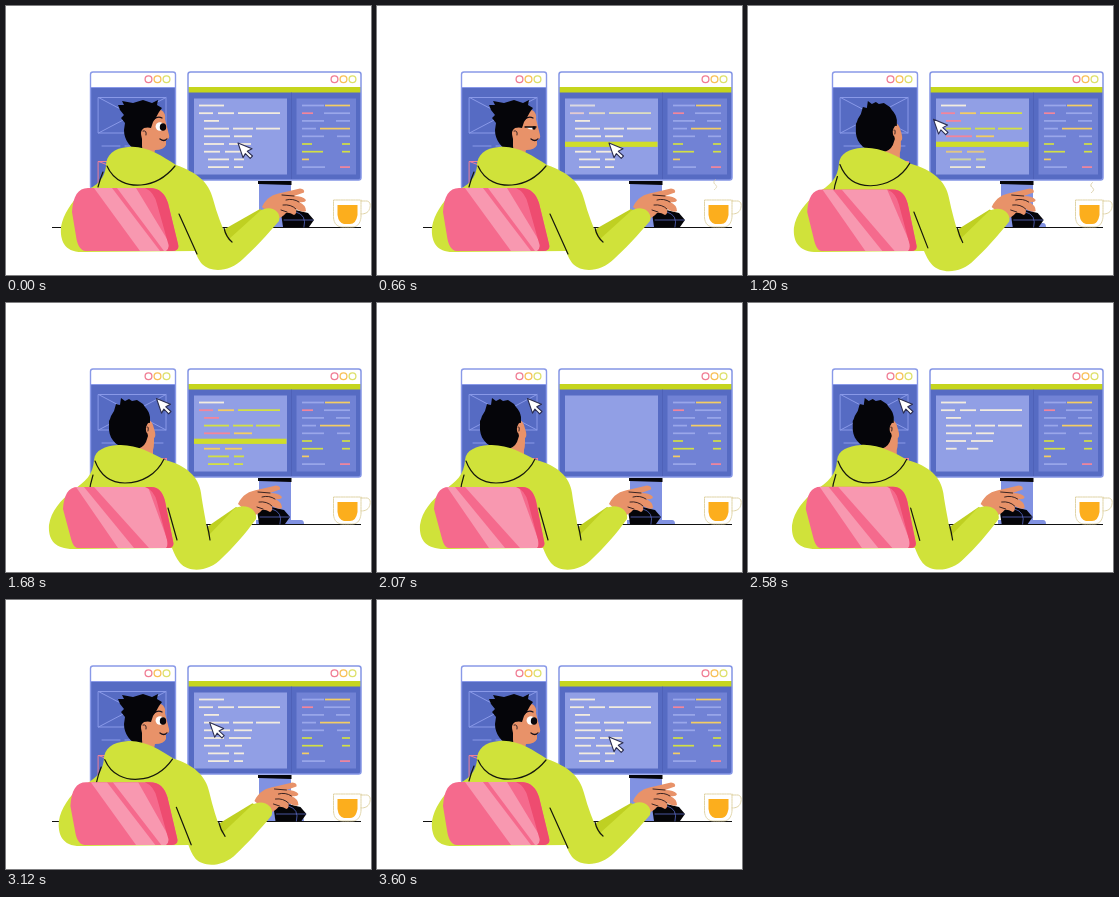
These frames come from a looping animation (365x269 px, 3630 ms). An HTML page:

```html
<!DOCTYPE html>
<html lang="en">
<head>
<meta charset="utf-8">
<title>Developer at a desk</title>
<style>
html, body { margin: 0; width: 100%; height: 100%; overflow: hidden; background: #fff; }
svg { display: block; width: 365px; height: 269px; }
</style>
</head>
<body>
<svg viewBox="0 0 365 269" fill="none" stroke-linecap="round" stroke-linejoin="round">
  <defs>
    <clipPath id="chairClip"><path id="chairEdge"/></clipPath>
    <clipPath id="faceClip"><path id="faceEdge"/></clipPath>
  </defs>

  <g id="leftWindow">
    <rect x="84.5" y="66" width="85" height="117" rx="2.5" fill="#566bc3"/>
    <path d="M84.5 82V68.5Q84.5 66 87 66H167Q169.5 66 169.5 68.5V82Z" fill="#fff"/>
    <rect x="84.5" y="66" width="85" height="117" rx="2.5" stroke="#8999e8" stroke-width="1.4"/>
    <path d="M85 81.5H169M92.5 91.5H160V127H92.5ZL160 127M160 91.5L92.5 127M96 140H114M119 140H157" stroke="#8999e8"/>
    <path d="M92.5 155.5H160.5V181H92.5ZL160.5 181M160.5 155.5L92.5 181" stroke="#ef8097"/>
  </g>

  <g id="rightWindow">
    <rect x="182" y="66" width="173" height="108" rx="2.5" fill="#566bc3"/>
    <path d="M182 82V68.5Q182 66 184.5 66H352.5Q355 66 355 68.5V82Z" fill="#fff"/>
    <path d="M182 81H355V86.5H182Z" fill="#c5d51d"/>
    <path d="M188 92.5H281V168.5H188Z" fill="#919fe5"/>
    <path d="M290.5 92.5H350V168.5H290.5Z" fill="#7182d5"/>
    <path d="M285.5 87V173" stroke="#4e61b8"/>
    <rect x="182" y="66" width="173" height="108" rx="2.5" stroke="#8495e5" stroke-width="1.5"/>
  </g>
  <g id="dots" stroke-width="1.3"></g>
  <g id="notes" stroke-width="1.7" stroke-linecap="butt"></g>
  <g id="code" stroke-width="1.8" stroke-linecap="butt"></g>
  <rect id="bar" x="188" y="135.7" height="5.2" fill="#d0dd2a"/>

  <path d="M253 175H285V217H295Q298 217 298 221H250V217H253Z" fill="#8192e2"/>
  <path d="M252 175H285.5V179L252 178Z" fill="#050509"/>
  <path d="M46 221.5H355" stroke="#111" stroke-linecap="butt"/>

  <g id="cup">
    <path d="M327.5 194H355V211Q354 221 346 221H337Q328 221 327.5 211Z" fill="#fff"/>
    <path d="M327.5 194H355V211Q354 221 346 221H337Q328 221 327.5 211ZM355 195H361Q365 196 364 201Q363 208 355 208" stroke="#dccf9b" stroke-width=".9" stroke-dasharray="1.6 .9"/>
    <path d="M331.5 199H351.5V209Q350 218 344 218H338Q332.5 217 331.5 209Z" fill="#fcae1d"/>
  </g>
  <path id="steam" stroke="#d5c89b" stroke-width=".9" stroke-dasharray="1.8 1"/>

  <g id="hand">
    <path d="M277 221L275 207L285 203L302 207L308 214L303 221Z" fill="#050509"/>
    <path d="M290 206Q301 209 298 221M278 214H307" stroke="#5969c3" stroke-width=".8"/>
    <path d="M256 201C260 192 267 188 277 186.5L294 182.5Q299 183 298 186.5L288 190Q297 190 300 194Q299 197 293 196Q300 199 300 205Q297 207 290 203Q291 208 288 209Q283 206 280 207Q276 212 270 213Z" fill="#e89269"/>
    <path d="M276 189L288 190M280 194Q287 192 293 196M277 199Q285 198 290 203M275 204L281 206" stroke="#25171a" stroke-width=".9"/>
  </g>

  <g id="head">
    <path id="face" fill="#e89269"/>
    <g clip-path="url(#faceClip)">
      <g id="features">
        <path d="M148 113Q152 110 156 112M154 133Q158 136 161 133" stroke="#17101a" stroke-width="1.3"/>
        <g id="openEye">
          <ellipse cx="153.8" cy="120.5" rx="4.2" ry="4.2" fill="#fff"/>
          <ellipse cx="157" cy="121" rx="3.2" ry="3.8" fill="#08070b"/>
        </g>
        <g id="calmEye">
          <path d="M149 121H159Q155 126 149 121Z" fill="#fff"/>
          <circle cx="157" cy="122" r="1.7" fill="#08070b"/>
          <path d="M148 121H159" stroke="#08070b" stroke-width="1.3"/>
        </g>
      </g>
    </g>
    <path id="hair" fill="#050509"/>
    <ellipse id="ear" fill="#e89269"/>
    <path id="earLine" stroke="#25171a" stroke-width=".9"/>
  </g>

  <path id="fold" fill="#bfd022"/>
  <path id="body" fill="#d0e23a"/>
  <path id="seams" stroke="#15170c" stroke-width="1.2"/>
  <path id="chair" fill="#f56a8d"/>
  <g clip-path="url(#chairClip)">
    <path id="shine" fill="#f898b0"/>
    <path id="side" fill="#ee4c70"/>
  </g>
  <path id="cursor" d="M0 0L14 5.8L9.3 8.3L14.5 13L12.2 15.3L7.4 10.6L5 14.6Z" fill="#fff" stroke="#2b2d4f" stroke-width="1.1"/>
</svg>

<script>
const LOOP = 3630;
const $ = id => document.getElementById(id);
const set = (id, attrs) => {
  for (const k in attrs) $(id).setAttribute(k, attrs[k]);
};
const clamp = x => Math.max(0, Math.min(1, x));
const lerp = (a, b, p) => a + (b - a) * p;
const span = (t, from, to) => clamp((t - from) / (to - from));
const ease = u => u < .5 ? 2 * u * u : 1 - 2 * (1 - u) * (1 - u);
// 0 to 1 and back again within the loop
const trip = (t, a, b, c, d) => ease(span(t, a, b)) - ease(span(t, c, d));

function add(parent, tag, attrs) {
  const el = document.createElementNS('http://www.w3.org/2000/svg', tag);
  for (const k in attrs) el.setAttribute(k, attrs[k]);
  $(parent).append(el);
  return el;
}

// Points to the right, on the arm, follow the arm's own progress.
function blend([a, b], p, arm = p) {
  const ends = b.match(/[\d.]+/g);
  let i = 0;
  return a.replace(/([\d.]+) ([\d.]+)/g, (_, x, y) => {
    const q = lerp(p, arm, span(+x, 150, 200));
    return lerp(+x, +ends[i++], q).toFixed(2) + ' ' + lerp(+y, +ends[i++], q).toFixed(2);
  });
}

// Each shape has a right-leaning and a left-leaning pose.
const bodyShapes = {
  body: [
    'M100 160C100 149 108 142 122 141C140 139 156 150 170 159C190 166 203 176 207 193C211 208 216 221 222 234L254 205C264 198 276 205 273 215C262 228 246 245 237 253C224 266 205 267 196 258C192 253 191 250 189 245L78 246C58 247 54 234 55 221C57 208 66 196 74 188C90 180 98 175 100 160Z',
    'M88 157C89 147 99 143 112 142C130 141 146 150 159 157C180 162 193 174 195 190C197 205 200 217 202 233L228 206C238 199 252 206 250 216C240 230 225 247 216 255C203 269 183 270 174 260C170 255 168 250 166 245L70 246C48 247 42 236 43 222C45 208 55 197 66 188C80 178 87 172 88 157Z'
  ],
  fold: ['M217 224L254 203L262 208L222 238Z', 'M198 226L230 204L238 208L202 238Z'],
  seams: [
    'M101 160C108 176 123 180 135 179C149 178 160 171 169 160M92 181Q94 173 97 166M173 208L191 248M218 222Q220 231 226 236',
    'M89 158C95 174 106 180 119 180C136 180 151 171 158 156M83 192Q84 181 87 172M162 205L171 237M201 222Q203 229 204 237'
  ]
};
const chairShapes = {
  chair: [
    'M66 206C67 190 72 182 82 182L143 182C154 182 159 188 162 197L172 238Q174 245 166 245L80 245C74 245 71 238 70 230Z',
    'M57 206C58 192 62 184 72 184L145 184C153 184 157 190 159 198L167 238Q169 245 162 245L72 245C68 245 66 240 64 232Z'
  ],
  shine: [
    'M88 182L106 182L154 245L134 245ZM111 182L130 182L164 238L162 245L158 245Z',
    'M70 184L78 184L128 245L112 245ZM88 184L142 184L161 236L161 245L143 245Z'
  ],
  side: [
    'M139 181L162 181L178 245L160 245Q164 242 162 237L151 198Q148 186 139 182Z',
    'M139 183L162 183L172 245L160 245Q163 242 161 237L151 199Q148 187 139 184Z'
  ]
};
const headShapes = {
  face: [
    'M135 105L152 103C158 104 160 109 159 113L163 129Q164 133 160 134L160 139Q158 144 149 144L146 158L128 158L126 130Z',
    'M125 118L140 115C144 117 146 119 147 122L149 129Q150 134 148 135L148 140Q148 144 147 147L147 156L122 156L120 130Z'
  ],
  hair: [
    'M114 104L112 99L118 99L116 95L127 97L137 94L146 97L152 94L151 99L156 102L153 106Q150 112 147 116L145 122Q142 121 138 122Q134 126 136 133L136 140Q137 145 134 146C124 142 118 134 118 124L119 117L115 112L118 109Z',
    'M105 113L108 108L110 101L114 102L115 95L119 98L123 96L126 98L131 97L137 101L139 104Q143 108 144 114L144 120Q142 119 141 122Q140 127 142 133L140 139Q137 145 130 146C113 147 104 138 103 127L103 122L103 118L104 116Z'
  ],
  earLine: ['M137 125Q141 124 140 129', 'M141 124Q143 123 142 128']
};

const colors = { w: '#f3ecdf', p: '#f3859b', y: '#f4cd63', g: '#d3e044', l: '#9aa7ea' };
const rowY = i => 99.5 + i * 7.7;

// "start-end colour" for every dash of a row
const parse = row => row.split(' ').map(s => {
  const [, a, b, c] = s.match(/(\d+)-(\d+)(\w)/);
  return { a: +a, b: +b, c };
});
const codeRows = [
  '193-218w', '193-207p 212-228y 232-274g', '198-213p', '198-223g 227-247g 250-274g',
  '198-224p 228-246y', '198-218g 223-245g', '198-214y 219-236y', '202-223g 228-238g', '202-223g 228-237g'
].map(parse);
const noteRows = [
  '296-318l 319-344y', '296-307p 318-344l', '296-318l 330-344l', '296-310l 314-344y',
  '296-318l 331-344l', '296-306g 336-344g', '296-317g 336-344g', '296-303y', '296-319l 334-344p'
].map(parse);

const dashes = [];
codeRows.forEach((row, i) => row.forEach(d => {
  dashes.push({
    ...d, row: i,
    plain: add('code', 'path', { stroke: colors.w }),
    tint: add('code', 'path', { stroke: colors[d.c] })
  });
}));
noteRows.forEach((row, i) => row.forEach(d =>
  add('notes', 'path', { d: `M${d.a} ${rowY(i)}H${d.b}`, stroke: colors[d.c] })));
for (const x of [142.5, 328.5])
  ['#f07c93', '#f8c055', '#dde069'].forEach((stroke, i) =>
    add('dots', 'circle', { cx: x + i * 9, cy: 73.2, r: 3.4, stroke }));

function drawCode(t) {
  const retyping = t >= 2060;
  const gone = retyping ? 0 : span(t, 1800, 2060);
  for (const { a, b, row, plain, tint } of dashes) {
    const shown = retyping ? clamp((t - 2100) / 72 - row) : 1;
    const d = `M${a} ${rowY(row)}H${lerp(a, b, shown)}`;
    const mix = retyping ? 0 : span(t, 530 + row * 82, 760 + row * 82);
    plain.setAttribute('d', d);
    plain.setAttribute('opacity', shown ? (1 - mix) * (1 - gone) : 0);
    tint.setAttribute('d', d);
    tint.setAttribute('opacity', mix * (1 - gone));
  }
  set('bar', { width: 92.5 * ease(span(t, 300, 600)), opacity: retyping ? 0 : 1 - gone });
}

function drawSteam(t) {
  const u = span(t, 540, 1440);
  const x = lerp(337, 347, u);
  const y = lerp(178, 183, u);
  set('steam', {
    d: `M${x} ${y - 5}q-3 3 0 5t-1 5`,
    opacity: Math.min(1, 6 * u, 6 * (1 - u))
  });
}

function draw(t) {
  const lean = trip(t, 640, 1500, 2350, 3450);
  const reach = trip(t, 800, 1590, 2450, 3560);
  const turn = trip(t, 820, 1160, 2700, 3060);
  const move = trip(t, 760, 1580, 2700, 3420);

  for (const id in bodyShapes) set(id, { d: blend(bodyShapes[id], lean, reach) });
  for (const id in chairShapes) set(id, { d: blend(chairShapes[id], lean) });
  set('chairEdge', { d: blend(chairShapes.chair, lean) });
  set('hand', { transform: `translate(${-24 * reach} 0)` });

  for (const id in headShapes) set(id, { d: blend(headShapes[id], turn) });
  set('faceEdge', { d: blend(headShapes.face, turn) });
  set('head', { transform: `translate(${20 * turn * (1 - lean)} 0)` });
  set('ear', { cx: lerp(139, 142.5, turn), cy: lerp(127, 126, turn), rx: lerp(4, 2.6, turn), ry: 4.6 });
  set('features', { transform: `translate(${6 * turn} 0)`, opacity: 1 - span(turn, .35, .75) });
  const calm = t > 540 && t < 1400;
  set('openEye', { opacity: calm ? 0 : 1 });
  set('calmEye', { opacity: calm ? 1 : 0 });

  set('cursor', { transform: `translate(${lerp(232, 150.5, move)} ${lerp(137, 95.5, move)})` });
  drawCode(t);
  drawSteam(t);
}

let start;
function tick(now) {
  start ??= now;
  draw((now - start) % LOOP);
  requestAnimationFrame(tick);
}
draw(0);
requestAnimationFrame(tick);
</script>
</body>
</html>
```
